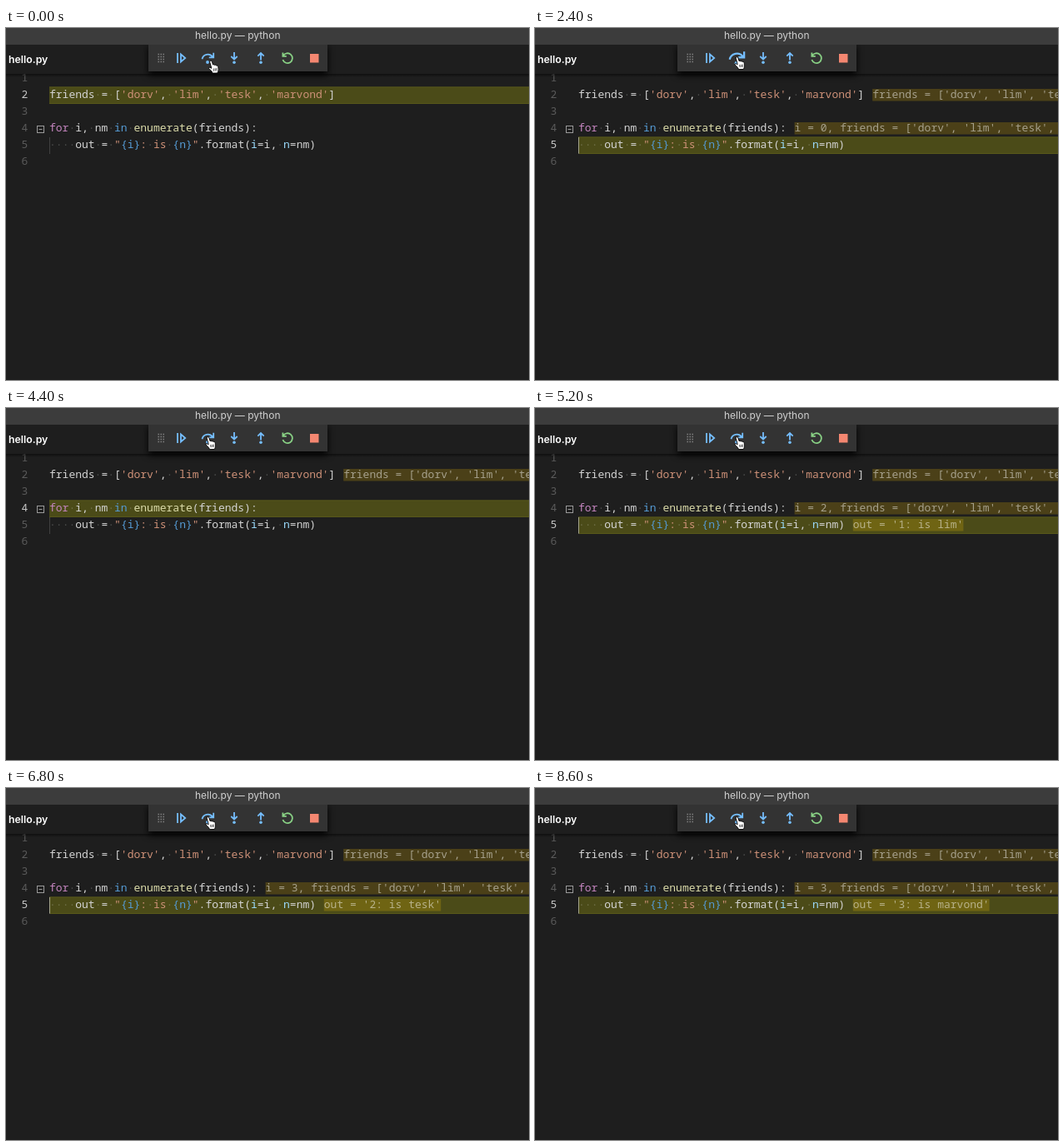
These frames come from a looping animation (628 px wide and 422 px high, 9200 ms). An HTML page:

```html
<!DOCTYPE html>
<html lang="en">
<head>
<meta charset="utf-8">
<title>hello.py</title>
<style>
  html, body { margin: 0; width: 100%; height: 100%; overflow: hidden; background: #1e1e1e; }
  svg { display: block; width: 628px; height: 422px; }
  text { white-space: pre; }
  .mono { font: 500 13px "Noto Sans Mono", "Liberation Mono", monospace; fill: #d4d4d4; }
  .mono .str { fill: #ce9178; }
  .mono .key { fill: #c586c0; }
  .mono .op { fill: #569cd6; }
  .mono .fn { fill: #dcdcaa; }
  .mono .arg { fill: #9cdcfe; }
  .mono .ws { fill: #e3e4e2; fill-opacity: .24; }
  .mono.num { font-weight: 400; fill: #5a5a5a; }
  .mono.num.active { fill: #c6c6c6; }
  .hint rect { fill: rgba(255, 200, 0, .2); }
  .hint text { fill: rgba(255, 255, 255, .5); }
  .title { font: 400 12px Inter, Roboto, sans-serif; fill: #d0d0d0; }
  .tab { font: 600 12.3px Inter, Roboto, sans-serif; fill: #fff; }
  .bar { filter: drop-shadow(0 4px 4px #000); }
  .icon { fill: none; stroke: #75beff; stroke-width: 1.8; }
  .dot { fill: #75beff; stroke: none; }
  #over { transform-origin: 242px 36px; }
</style>
</head>
<body>
<svg viewBox="0 0 628 422">
  <defs>
    <linearGradient id="fade" x2="0" y2="1">
      <stop stop-color="#000" stop-opacity=".5"/>
      <stop offset="1" stop-color="#000" stop-opacity="0"/>
    </linearGradient>
  </defs>
  <rect width="628" height="422" fill="#1e1e1e"/>

  <g id="current">
    <rect x="52" y="70.5" width="576" height="20.5" fill="#4b4b18"/>
    <path d="M52 71H628M52 90.5H628" stroke="#57571a"/>
  </g>
  <path d="M52.5 131V151" stroke="#404040"/>
  <path id="caret" d="M52.5 131V150.5" stroke="#a5a58c"/>
  <g id="code"></g>
  <g fill="none" stroke="#9a9a9a">
    <rect x="37.5" y="117.5" width="8" height="8"/>
    <path d="M39.5 121.5H43.5"/>
  </g>

  <rect y="20" width="628" height="35" fill="#1e1e1e"/>
  <rect y="55" width="628" height="4" fill="url(#fade)"/>
  <text class="tab" x="3" y="42">hello.py</text>

  <rect class="bar" x="171" y="18" width="215" height="34" fill="#333"/>
  <rect width="628" height="20" fill="#3c3c3c"/>
  <text class="title" x="227" y="13">hello.py — python</text>

  <path d="M182.5 31.5h8m-8 3h8m-8 3h8m-8 3h8" stroke="#858585" stroke-width="1.4" stroke-dasharray="1.4 1.6"/>
  <g class="icon">
    <path d="M206 30V42M210 31.5V40.5L215.2 36Z"/>
    <g id="over">
      <path d="M235.5 37.3A7 7 0 0 1 248 34.6M249.2 29.8V35.4H243.8"/>
      <circle class="dot" cx="242" cy="41" r="1.9"/>
    </g>
    <path d="M274 29V37.5M270.3 34L274 37.6L277.7 34"/>
    <circle class="dot" cx="274" cy="41.3" r="1.8"/>
    <path d="M306 38.5V30M302.3 33.6L306 30L309.7 33.6"/>
    <circle class="dot" cx="306" cy="41.3" r="1.8"/>
    <path d="M332.8 33.4A5.9 5.9 0 1 1 332.4 38M332.4 29.4V33.8H336.8" stroke="#89d185"/>
  </g>
  <rect x="365" y="31" width="10.5" height="10.5" fill="#f48771"/>

  <g id="hand" stroke="#000" stroke-width=".9" stroke-linejoin="round">
    <path fill="#fff" d="M4 8.5L2.2 2.2Q2 .6 3.4 .6Q4.5 .7 4.9 2L6 5.6Q7.2 4.8 8 6Q9.4 5.2 10.1 6.5Q11.8 6 12.2 7.8L12.6 11Q12.6 13 11.4 15.5L5.6 15.6Q5 13.6 2.5 11.4Q.3 9.6 1.2 8.8Q2.4 8.2 4 9.9Z"/>
    <path d="M6.6 10L7 13.2M8.6 9.8L8.8 13M10.4 9.6V12.8" stroke-width=".7"/>
  </g>
</svg>
<script>
  const LOOP = 9200, PRESS = 200, CHAR = 7.8, LEFT = 52;
  const CLICKS = [400, 1600, 2400, 3400, 4200, 5000, 5600, 6600, 7600, 8400];
  const names = ["dorv", "lim", "tesk", "marvond"];
  const list = `[${names.map(n => `'${n}'`).join(", ")}]`;
  const $ = id => document.getElementById(id);
  const baseline = line => 44 + 20 * line;

  // Each line is a run of [text, class] tokens.
  const source = {
    2: [["friends = ["], ...names.flatMap((n, k) => [[`'${n}'`, "str"], [k < 3 ? ", " : "]"]])],
    4: [["for", "key"], [" i, nm "], ["in", "op"], [" "], ["enumerate", "fn"], ["(friends):"]],
    5: [["    out = "], ['"', "str"], ["{i}", "op"], [": is ", "str"], ["{n}", "op"], ['"', "str"],
        [".format("], ["i", "arg"], ["=i, "], ["n", "arg"], ["=nm)"]]
  };

  function add(parent, tag, attrs = {}, content = "") {
    const el = document.createElementNS("http://www.w3.org/2000/svg", tag);
    for (const key in attrs) el.setAttribute(key, attrs[key]);
    el.textContent = content;
    return parent.appendChild(el);
  }

  const numbers = [1, 2, 3, 4, 5, 6].map(line =>
    add($("code"), "text", { class: "mono num", x: 18.4, y: baseline(line) }, line));

  const hints = {};
  for (const line in source) {
    const y = baseline(+line);
    const row = add($("code"), "text", { class: "mono", x: LEFT, y });
    let length = 0;
    for (const [text, kind = ""] of source[line]) {
      length += text.length;
      for (const part of text.split(/( )/).filter(Boolean)) {
        add(row, "tspan", { class: part === " " ? "ws" : kind }, part.replace(" ", "·"));
      }
    }
    const x = LEFT + length * CHAR + 10;
    const group = add($("code"), "g", { class: "hint" });
    hints[line] = {
      box: add(group, "rect", { x, y: y - 11, height: 14.5 }),
      label: add(group, "text", { class: "mono", x, y })
    };
  }

  function setHint(line, text) {
    const { box, label } = hints[line];
    box.setAttribute("width", text.length * CHAR);
    label.textContent = text;
  }

  function draw(time) {
    const steps = CLICKS.filter(c => time >= c + PRESS).length;
    const pressed = CLICKS.some(c => time >= c && time < c + PRESS);
    const line = steps === 0 ? 2 : steps % 2 ? 4 : 5;
    const pass = steps / 2 - 1;
    const inLoop = line === 5;

    $("current").setAttribute("transform", `translate(0 ${20 * (line - 2)})`);
    $("caret").style.display = inLoop ? "" : "none";
    numbers.forEach((el, k) => el.classList.toggle("active", k + 1 === line));
    setHint(2, steps ? `friends = ${list}` : "");
    setHint(4, inLoop ? `i = ${Math.min(pass, 3)}, friends = ${list}` : "");
    setHint(5, inLoop && pass > 0 ? `out = '${pass - 1}: is ${names[pass - 1]}'` : "");
    $("over").style.transform = pressed ? "scale(1.27)" : "";
    $("hand").setAttribute("transform", time < 200 ? "translate(242.5 38.5)" : "translate(239 34)");
  }

  const start = performance.now();
  let shown = -1;
  function tick() {
    const time = Math.floor((performance.now() - start) % LOOP / 200) * 200;
    if (time !== shown) draw(shown = time);
    requestAnimationFrame(tick);
  }
  tick();
</script>
</body>
</html>
```
